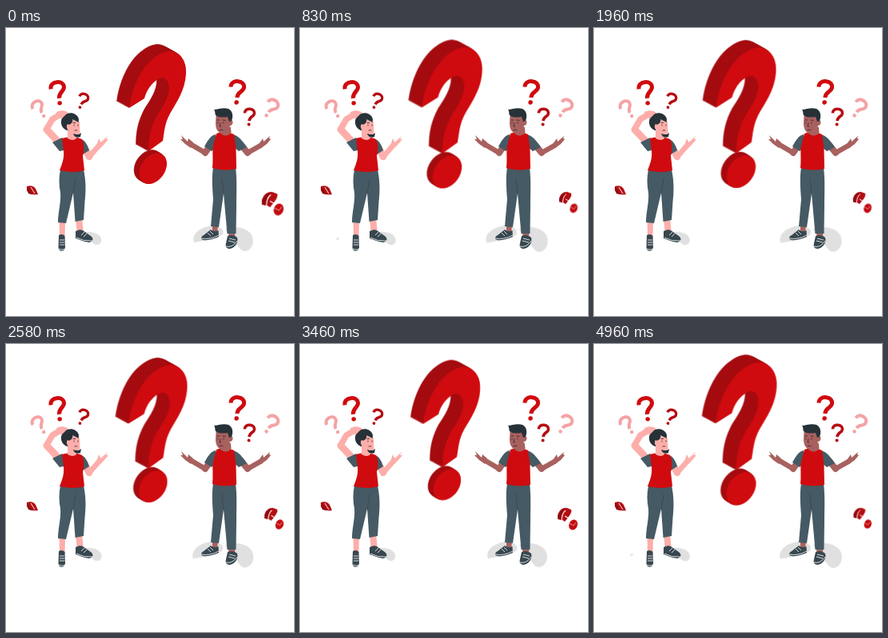
Recreate the animation shown at these times as an HTML page. Size 360x360 px, loop 5000 ms.

```html
<!DOCTYPE html>
<html lang="en">
<head>
<meta charset="utf-8">
<title>Two people wondering</title>
<style>
  html, body { margin: 0; width: 100%; height: 100%; overflow: hidden; background: #fff; }
  svg { display: block; width: 100%; height: 100%; }
  .mark, .bean, .shade { animation: 5s linear infinite; }
  .mark { transform-origin: 181.5px 107.8px; animation-name: swell; }
  .bean { animation-name: shrink; }
  .shade { animation-name: spread; }
  .blink { animation: blink 5s step-end infinite; }
  .speck { animation: speck 5s step-end infinite; }
  @keyframes swell {
    0%, 71.2% { transform: scale(1); }
    23%, 94.4% { transform: scale(1.087); }
    100% { transform: scale(1.076); }
  }
  @keyframes shrink {
    0%, .79% { transform: scale(1.13); }
    .8%, 71.2% { transform: scale(1); }
    23%, 94.4% { transform: scale(.84); }
    100% { transform: scale(.86); }
  }
  @keyframes spread {
    0%, 71.2% { transform: scale(1); }
    23%, 94.4% { transform: scale(1.05); }
    100% { transform: scale(1.04); }
  }
  @keyframes blink { 0%, 88% { opacity: 1; } 83% { opacity: 0; } }
  @keyframes speck { 0%, 32%, 71% { opacity: 0; } 15%, 90% { opacity: 1; } }

  .limb { fill: none; stroke-linecap: round; stroke-linejoin: round; }
  .red { fill: #cf0b0f; }
  .slate { fill: #455a64; }
  .dark { fill: #263238; }
  .shoe { fill: #37474f; }
  .fair { fill: #fdaeaa; }
  .tan { fill: #a8615f; }
  .limb.fair { fill: none; stroke: #fdaeaa; }
  .limb.tan { fill: none; stroke: #a8615f; }
  .lace { fill: none; stroke: #fff; stroke-width: .8; }
  .seam { fill: none; stroke: #34464f; stroke-width: .7; }
  .look { fill: none; stroke: #3a2a2c; stroke-width: .9; stroke-linecap: round; }
</style>
</head>
<body>
<svg viewBox="0 0 360 360">
  <defs>
    <g id="q">
      <path d="M-8.4-5.5C-8.8-10.8-4.6-13.4 0-13.4C5.3-13.4 8.2-10.4 8.2-6.6C8.2-.8 .6-1 .8 7" fill="none" stroke="currentColor" stroke-width="5"/>
      <ellipse cx=".8" cy="13" rx="2.8" ry="2.7" fill="currentColor"/>
    </g>
    <path id="hook" d="M154 100C157 76 169 48 187 36C194 31 200 29 205 29C219 30 226 43 225 57C224 78 213 93 205 107C198 120 198 130 196 141L178 154C178 137 181 124 189 109C197 97 204 86 204 74C203 64 197 60 190 64C182 69 176 77 173 88Z"/>
    <ellipse id="dot" cx="183.8" cy="175.700" rx="15" ry="21" transform="rotate(35 183.8 175.700)"/>
  </defs>

  <!-- floor shadows -->
  <g fill="#e0e0e0">
    <g class="blink"><path class="shade" style="transform-origin:105px 262px" d="M94 257C102 253 114 255 118 261C121 267 118 271 113 271C108 270 107 265 98 264Z"/></g>
    <ellipse class="speck" cx="47" cy="263.5" rx="2" ry="1.2" transform="rotate(-35 47 263.5)"/>
    <g class="shade" style="transform-origin:284px 256px">
      <path d="M235 268C231 258 243 248 259 247C270 248 274 254 270 259L247 266Z"/>
      <path d="M274 251C288 246 305 251 308 261C311 271 305 279 298 279C291 278 291 270 282 266Z"/>
    </g>
  </g>

  <!-- beans -->
  <g>
    <path d="M26 198C31 196 36 198 37.500 202L40 208C35 209 28 208 26 203Z" fill="#b20d12"/>
    <path d="M31 199L36 207" stroke="#fff" stroke-width=".9"/>
    <path d="M26 198L28 207L33 208Z" fill="#8c0c10"/>
  </g>
  <g class="bean" style="transform-origin:339px 205px">
    <path d="M322 214C324 207 329 204 334 205L339 207C340 210 338 213 335 217L331 222L328 220L322 219Z" fill="#b20d12"/>
    <path d="M331 205C326 207 322 212 322 218L326 220C326 214 328 209 331 205Z" fill="#8c0c10"/>
    <path d="M332 208C328 211 327 216 327 221M331 215L336 218" fill="none" stroke="#fff" stroke-width="1.100"/>
  </g>
  <g class="bean" style="transform-origin:347px 219.500px">
    <ellipse cx="341.500" cy="226" rx="5.300" ry="6.700" transform="rotate(22 341.500 226)" fill="#c40c10"/>
    <path d="M336 224L342 227L345 223" fill="none" stroke="#f3b5b5" stroke-width=".8"/>
  </g>

  <!-- small question marks -->
  <use href="#q" color="#f4a3a5" transform="translate(41.500 101.500) rotate(-30) scale(.79)"/>
  <use href="#q" color="#cf0b0f" transform="translate(65 81) rotate(-6)"/>
  <use href="#q" color="#b50d12" transform="translate(95.500 91) rotate(24) scale(.67)"/>
  <use href="#q" color="#cf0b0f" transform="translate(288.700 80) rotate(6)"/>
  <use href="#q" color="#b50d12" transform="translate(304 111) rotate(6) scale(.73)"/>
  <use href="#q" color="#f4a3a5" transform="translate(330.800 100) rotate(33) scale(.82)"/>

  <g class="mark">
    <g id="depth" fill="#a50c10" stroke="#a50c10" stroke-width=".5"></g>
    <g class="red"><use href="#dot"/><use href="#hook"/></g>
  </g>

  <!-- woman -->
  <g>
    <path class="fair" d="M66.500 240H74L73.500 262H67ZM87 238L95 237L97 258L89 259Z"/>
    <path class="shoe" d="M66 259C69 257 72 258 73.500 260L74 274C74 280 66 280 65.500 275ZM87 254C91 252 94 252 96 253L106 260C110 263 109 267 104 268C96 267 91 264 87 263Z"/>
    <path class="lace" d="M67 265H73M67 268H73.500M67 271H73.500M94 259L98 255M97 261L101 257M66 276Q70 278.500 74 276M88 262Q97 267 108 266"/>
    <path class="slate" d="M68 177L97 177C100 191 100 204 98.500 217L97 240L86.500 242L84 206L75 244L65 243C65 230 69 218 68 206C66 196 66 187 68 177Z"/>
    <path class="seam" d="M84 207L87 188"/>
    <path class="limb fair" stroke-width="9" d="M66 143L51 127"/>
    <path class="limb fair" stroke-width="7.500" d="M51 126L58 114L68 108"/>
    <path class="limb fair" stroke-width="8.500" d="M98 149L104 161"/>
    <path class="limb fair" stroke-width="6.500" d="M104 161L117 146"/>
    <path class="fair" d="M113 147L116 138L118.500 143L127 135L125 139L128 139L123 145L118 150Z"/>
    <path class="slate" d="M58 143L70 137L76 152L67 154ZM92 139C99 139 102 147 104 153L96 158Z"/>
    <path class="red" d="M70 138C78 136 88 136 95 139C98 145 98 153 96 160L98 178C89 181 76 180 67 178C70 170 73 163 72 154Z"/>
    <path class="dark" d="M69 116C71 104 88 103 91 114L89 128L80 129C73 128 68 123 69 116Z"/>
    <path class="fair" d="M77 126L88 130L88 138C85 141 80 140 77 138Z"/>
    <path class="fair" d="M78 115C84 113 89 114 92 118L92.500 131C89 135 81 134 79 128C75 127 75 120 78 120Z"/>
    <path class="dark" d="M78 121C82 120 84 117 83 114L91 118C90 110 84 107 78 111ZM84 132C88 134 92 133 94 131L93 136C89 138 85 136 84 132Z"/>
    <path class="fair" d="M63 105C69 102 75 103 78 106L75 108L70 113L64 112Z"/>
    <path class="look" d="M85 121V122M90 121V122M84 118.500H86.500M86 128Q88 127 89 128"/>
  </g>

  <!-- man -->
  <g>
    <path class="tan" d="M258 245H265L264 258H258ZM277.500 250H286.500L286 264H279Z"/>
    <path class="shoe" d="M256 252C260 255 263 254 265.500 253L266 261C260 263 254 266 247 265C243 265 243 261 247 259ZM277 260C281 258 286 259 289 262C291 268 286 275 280 276C275 276 274 273 275 269Z"/>
    <path class="lace" d="M252 256L256 260M255 254L259 258M278 266L286 268M279 263L287 265M244 263Q255 265 266 259M275 273Q283 275 289 266"/>
    <path class="slate" d="M259 174L287 174C289 190 288 207 288 222L287.500 257L276.500 257L272 207L266 249L256 248L259 214C258 200 257 187 259 174Z"/>
    <path class="seam" d="M272 207L270 187"/>
    <path class="limb tan" stroke-width="8" d="M257 144L249 156M293 145L302 156"/>
    <path class="limb tan" stroke-width="6.500" d="M249 156L232 146M302 156L318 147"/>
    <path class="tan" d="M234 143L228 138L227 142L219 134L221 139L218 139L224 145L231 150ZM316 145L321 138L322 142L330 135L329 138L331 139L326 145L319 150Z"/>
    <path class="slate" d="M262 133C256 134 252 141 248 148L257 154L264 147ZM283 133C291 134 296 142 301 149L291 154L284 148Z"/>
    <path class="red" d="M263 132C269 130 278 130 285 133L287.500 150L288 176C280 178 266 178 258 175C259 166 258 157 258.500 149Z"/>
    <path class="tan" d="M269 124H281L281.500 131C278 136 270 135 268 131Z"/>
    <path class="tan" d="M262.500 110L279 109L281 115C285 115 284 122 280 122C279 128 276 132 269 132C264 130 262 125 262 119Z"/>
    <path class="dark" d="M260 102C265 102 271 99 278 101C284 104 284 111 282 116L279 117L277 111C271 112 265 112 262 109C261 107 262 105 260 102Z"/>
    <path class="look" d="M265 118V119M272 118V119M264 115H266.500M271 115L274 115.500M268 119L267 123H268.500M267 127.500Q269 126.500 271 127.500"/>
  </g>
</svg>
<script>
  // Stack shifted outlines behind each face to build its thickness.
  function extrude(id, dx, dy, steps) {
    let out = "";
    for (let i = steps; i > 0; i--) {
      out += `<use href="#${id}" x="${dx * i / steps}" y="${dy * i / steps}"/>`;
    }
    return out;
  }
  document.getElementById("depth").innerHTML =
    extrude("dot", -6.5, -4, 8) + extrude("hook", -15.5, -8.5, 18);
</script>
</body>
</html>
```
